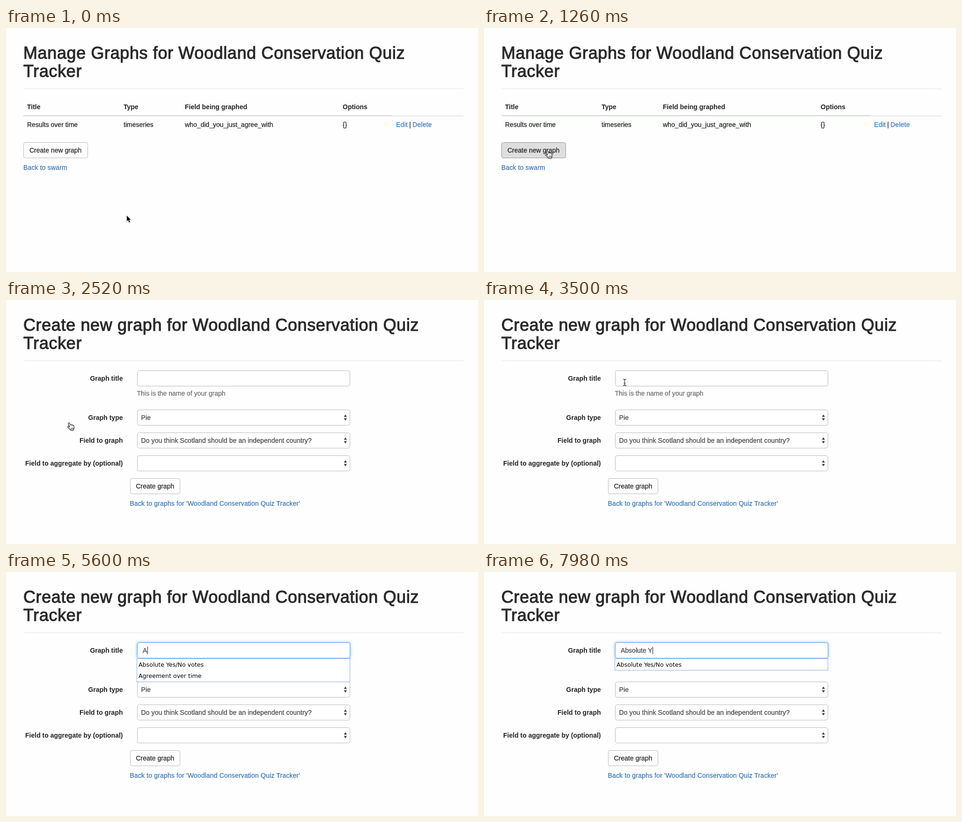
An HTML page for the animation above (8000 ms loop, 1008 by 523 pixels).

```html
<!DOCTYPE html>
<html lang="en">
<head>
<meta charset="utf-8">
<title>Graph manager</title>
<style>
  html, body { margin: 0; width: 100%; height: 100%; overflow: hidden; background: #fefefe; }
  svg { display: block; width: 1008px; height: 523px; }
  /* Thin strokes give the text the slightly heavier weight of smoothed type. */
  text {
    font: 14px "Liberation Sans", Arial, sans-serif; white-space: pre;
    fill: #222; stroke: #222; stroke-width: .25px;
  }
  .h1 { font-size: 36px; letter-spacing: .62px; fill: #2b2b2b; stroke: #2b2b2b; stroke-width: 1.1px; }
  .b { font-weight: bold; stroke: none; }
  .link { fill: #3a76b5; stroke: #3a76b5; letter-spacing: .15px; }
  .help { fill: #6b6b6b; stroke: #6b6b6b; }
  .val { fill: #444; stroke: #444; letter-spacing: .1px; }
  .typed { fill: #444; stroke: #444; }
  .hint { font: 12.6px "DejaVu Sans", sans-serif; fill: #000; stroke: none; }
  .box { fill: #fff; stroke: #b9b9b9; }
  .hover { fill: #dedede; stroke: #979797; }
  .focus { stroke: #66aae4; }
  .end { text-anchor: end; }
</style>
</head>
<body>
<svg id="stage" viewBox="0 0 1008 523" xmlns="http://www.w3.org/2000/svg"></svg>
<script>
const LOOP = 8000;
const TOPIC = 'Woodland Conservation Quiz';
const TOOL = 'Tracker';

const text = (x, y, str, cls = '') => `<text x="${x}" y="${y}" class="${cls}">${str}</text>`;
const box = (x, y, w, id = '') =>
  `<rect id="${id}" class="box" x="${x + .5}" y="${y + .5}" width="${w}" height="33" rx="4"/>`;
const bar = (x, y, w, h, fill, cls = '') =>
  `<rect class="${cls}" x="${x}" y="${y}" width="${w}" height="${h}" fill="${fill}"/>`;
const heading = str => text(37, 66, `${str} ${TOPIC}`, 'h1') + text(37, 105, TOOL, 'h1');
const label = (y, str) => text(249.5, y, str, 'b end');
const select = (y, str) => box(280, y, 454) + text(288.5, y + 22, str, 'val') +
  `<path fill="#3c3c3c" d="M721.5 ${y + 15.5}l3.3-5 3.3 5zM721.5 ${y + 18.5}l3.3 5 3.3-5z"/>`;

const listPage = heading('Manage Graphs for') +
  bar(37, 187, 788, 2, '#d2d2d2', 'line') + bar(825, 188, 152, 1, '#d0d0d0') +
  text(45, 174, 'Title', 'b') + text(251, 174, 'Type', 'b') +
  text(382, 174, 'Field being graphed', 'b') + text(719, 174, 'Options', 'b') +
  text(45, 212, 'Results over time') + text(251, 212, 'timeseries') +
  text(382, 212, 'who_did_you_just_agree_with') + text(719, 212, '{}') +
  text(833, 212, 'Edit', 'link') + text(861, 212, '|') + text(868, 212, 'Delete', 'link') +
  box(37, 245, 137, 'newBtn') + text(50, 267, 'Create new graph') +
  text(37, 304, 'Back to swarm', 'link');

const formPage = heading('Create new graph for') +
  label(173, 'Graph title') + label(257, 'Graph type') +
  label(306, 'Field to graph') + label(355, 'Field to aggregate by (optional)') +
  '<rect id="glow" x="279" y="150" width="457" height="36" rx="5" fill="#66afe9" opacity=".75" filter="url(#blur)"/>' +
  box(280, 151, 454, 'field') + text(292, 173, '', 'typed') +
  text(279.5, 205, 'This is the name of your graph', 'help') +
  select(235, 'Pie') +
  select(284, 'Do you think Scotland should be an independent country?') +
  select(333, '') +
  box(265, 382, 106) + text(277.5, 404, 'Create graph') +
  text(264.5, 441, `Back to graphs for '${TOPIC} ${TOOL}'`, 'link') +
  '<rect id="menu" x="279.5" y="185.5" width="455" fill="#fff" stroke="#82b2e0"/>' +
  text(283, 203, 'Absolute Yes/No votes', 'hint') + text(283, 227, 'Agreement over time', 'hint') +
  '<rect id="caret" width="1" fill="#111"/>';

// Pointer shapes, drawn from their own top left corner.
const pointers =
  `<g id="arrow"><path d="M1 1.2V13.2L3.8 10.6 5.8 15.4 7.9 14.5 5.9 9.9H9.7Z"
     fill="#000" stroke="#fff" stroke-width="1.4" paint-order="stroke" filter="url(#drop)"/></g>
   <g id="hand"><path d="M4.7 9.8L2.2 3.1a1.4 1.4 0 0 1 2.7-1L6.6 6.4a1.3 1.3 0 0 1 2.5-.1
     a1.3 1.3 0 0 1 2.4.4a1.2 1.2 0 0 1 2.2.8L14.2 11q.2 2-.8 3.4V16.6H6.6Q5.6 14.4 3.8 13.2L.9 10.6
     q-.7-1.3.5-1.7q1.4-.2 3.3 1.6zM8 12v2.6M10 12v2.6M12 12v2.6"
     fill="#fff" stroke="#222" stroke-width="1.1" stroke-linejoin="round" filter="url(#drop)"/></g>
   <g id="beam"><path d="M0 .5Q3 .5 3.5 2.5Q4 .5 7 .5M3.5 2V13M0 14.5Q3 14.5 3.5 12.5Q4 14.5 7 14.5M1.5 9.5H5.5"
     fill="none" stroke="#222" stroke-width="1.1"/></g>`;

const stage = document.getElementById('stage');
stage.innerHTML = `<defs>
  <filter id="blur" x="-10%" y="-60%" width="120%" height="220%"><feGaussianBlur stdDeviation="2.6"/></filter>
  <filter id="drop" x="-40%" y="-40%" width="180%" height="180%">
    <feDropShadow dx="0" dy="1" stdDeviation=".8" flood-opacity=".35"/></filter></defs>
  ${bar(37, 130, 940, 1, '#e4e4e4', 'rule')}
  <g id="list">${listPage}</g><g id="form">${formPage}</g>${pointers}`;

const $ = sel => stage.querySelector(sel);
const show = (el, on) => { el.style.display = on ? '' : 'none'; };

// Each track holds [start in ms, values...]; the latest started entry applies.
const mouse = [
  [0, 'arrow', 257, 401], [140, 'arrow', 222, 364], [280, 'arrow', 164, 301],
  [420, 'hand', 133, 270], [560, 'hand', 131, 262],
  [2800, 'arrow', 142, 260], [2940, 'arrow', 164, 246], [3080, 'arrow', 202, 224],
  [3220, 'arrow', 246, 199], [3360, 'beam', 284, 176], [3500, 'beam', 297, 169],
  [3640, 'beam', 299, 167], [5460, 'none', 0, 0]
];
const typing = [
  [0, ''], [5460, 'A'], [5740, 'Ab'], [5880, 'Abso'], [6160, 'Absolu'],
  [6300, 'Absolute'], [6720, 'Absolute '], [7000, 'Absolute Y']
];
const blink = [[0, 0], [3640, 1], [4060, 0], [4480, 1], [5040, 0], [5460, 1], [7420, 0], [7980, 1]];
const hints = [[0, 0], [5600, 2], [5740, 1]];
const at = (track, t) => track.filter(step => step[0] <= t).pop().slice(1);

const typed = $('.typed');
const hintLines = stage.querySelectorAll('.hint');

function draw(t) {
  const onForm = t >= 2520;
  show($('#list'), !onForm);
  show($('#form'), onForm);
  $('.rule').setAttribute('fill', t < 560 ? '#e4e4e4' : '#dcebd9');
  $('.line').setAttribute('fill', t < 560 ? '#d2d2d2' : '#c9d9c7');
  $('#newBtn').classList.toggle('hover', t >= 420);

  const focused = t >= 3640;
  $('#field').classList.toggle('focus', focused);
  show($('#glow'), focused);

  const [value] = at(typing, t);
  if (typed.textContent !== value) typed.textContent = value;
  const caret = $('#caret');
  const end = onForm && value ? typed.getComputedTextLength() : .6;
  caret.setAttribute('x', Math.round(292.4 + end));
  caret.setAttribute('y', value ? 160 : 158);
  caret.setAttribute('height', value ? 16 : 20);
  show(caret, at(blink, t)[0]);

  const [count] = at(hints, t);
  show($('#menu'), count);
  $('#menu').setAttribute('height', count > 1 ? 50 : 25);
  hintLines.forEach((line, i) => show(line, i < count));

  const [kind, x, y] = at(mouse, t);
  for (const id of ['arrow', 'hand', 'beam']) {
    const el = $('#' + id);
    show(el, id === kind);
    el.setAttribute('transform', `translate(${x} ${y})`);
  }
}

function tick() {
  draw(performance.now() % LOOP);
  requestAnimationFrame(tick);
}
tick();
</script>
</body>
</html>
```
